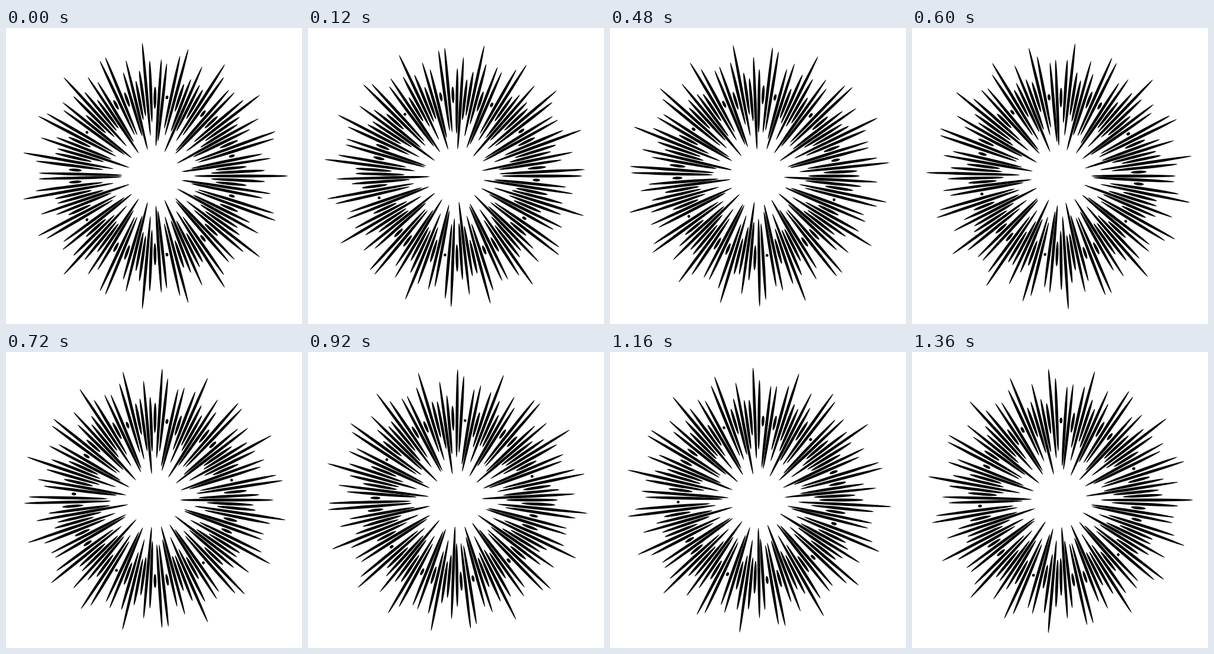
Recreate the animation shown at these times as an HTML page with a canvas. Size 500x500 px, loop 1.4 s.

```html
<!DOCTYPE html>
<html>
<head>
<meta charset="utf-8">
<style>
  html, body { margin: 0; width: 100%; height: 100%; overflow: hidden; background: #fff; }
  canvas { display: block; }
</style>
</head>
<body>
<canvas id="stage" width="500" height="500"></canvas>
<script>
const ctx = document.getElementById('stage').getContext('2d');
const TAU = 2 * Math.PI;
const LOOP = 1400, STEP = 40;
const SPIKES = 125, WAVES = 19;
const RING = 135, SHIFT = 12, HALF_LENGTH = 79, HALF_WIDTH = 2.4;

function drawSpike(angle, swing) {
  const center = RING + SHIFT * swing;
  const half = Math.max(HALF_WIDTH, HALF_LENGTH * Math.abs(swing));
  ctx.beginPath();
  ctx.ellipse(250 + center * Math.cos(angle), 250 - center * Math.sin(angle),
    half, HALF_WIDTH, -angle, 0, TAU);
  ctx.fill();
}

function draw(time) {
  const phase = TAU * (Math.floor(time / STEP) * STEP % LOOP) / LOOP;
  ctx.fillStyle = '#fff';
  ctx.fillRect(0, 0, 500, 500);
  ctx.fillStyle = '#000';
  for (let i = 0; i < SPIKES; i++) {
    const angle = TAU * i / SPIKES;
    drawSpike(angle, Math.cos(WAVES * angle - phase));
  }
}

function tick() {
  draw(performance.now());
  requestAnimationFrame(tick);
}
tick();
</script>
</body>
</html>
```
